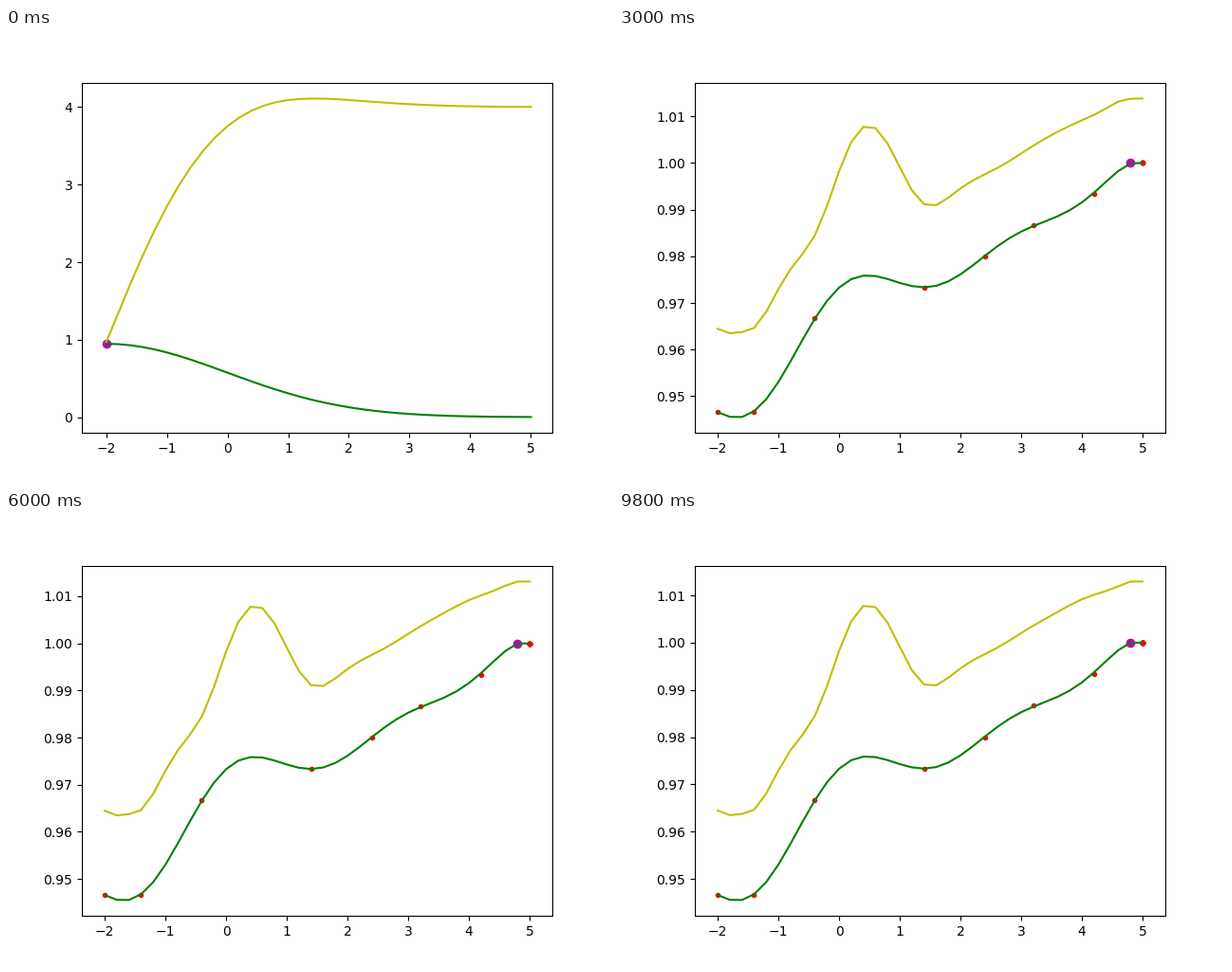
These frames come from a looping animation (640x480 px, 10000 ms). A matplotlib script:

```python
import numpy as np
import matplotlib.pyplot as plt
from matplotlib.animation import FuncAnimation

STEPS = 50
NOISE = 1e-5
KAPPA = 4
GRID = np.linspace(-2, 5, 36)

# Score of each setting the search visits: correct answers out of 150.
HITS = {-2.0: 142, -1.4: 142, -0.4: 145, 1.4: 146, 2.4: 147, 3.2: 148, 4.2: 149}


def score(x):
    return HITS.get(round(float(x), 1), 150) / 150


def kernel(a, b, length=2.0):
    return np.exp(-((a[:, None] - b[None, :]) ** 2) / (2 * length**2))


def posterior(xs, ys):
    k = kernel(xs, xs) + NOISE * np.eye(len(xs))
    cross = kernel(xs, GRID)
    weights = np.linalg.solve(k, cross)
    mean = weights.T @ ys
    var = 1 + NOISE - np.sum(cross * weights, axis=0)
    return mean, mean + KAPPA * np.sqrt(var)


def search():
    """Upper-confidence-bound search, one new sample per step."""
    xs, steps = [GRID[0]], []
    for _ in range(STEPS):
        x = np.array(xs)
        y = np.array([score(v) for v in xs])
        mean, upper = posterior(x, y)
        steps.append((x, y, mean, upper))
        xs.append(GRID[np.argmax(upper)])
    return steps


fig, ax = plt.subplots(figsize=(6.4, 4.8), dpi=100)
AXES_PX = np.array([496.0, 369.6])
steps = search()


def view(x, y, mean, upper):
    """Limits that leave room for the markers as well as the curves."""
    lo = np.array([GRID[0], min(mean.min(), upper.min())])
    hi = np.array([GRID[-1], max(mean.max(), upper.max())])
    points = np.column_stack([x, y])
    for radius, group in ((1.5, points), (3, points[-1:])):
        pad = radius * 1.1 * (hi - lo) / AXES_PX
        lo, hi = (np.minimum(lo, group.min(axis=0) - pad),
                  np.maximum(hi, group.max(axis=0) + pad))
    margin = 0.05 * (hi - lo)
    return lo - margin, hi + margin


def draw(i):
    x, y, mean, upper = steps[i]
    ax.clear()
    ax.plot(GRID, upper, "y")
    ax.plot(GRID, mean, "g")
    ax.scatter(x, y, c="r", marker=".")
    ax.scatter(x[-1:], y[-1:], c="m")
    lo, hi = view(x, y, mean, upper)
    ax.set_xlim(lo[0], hi[0])
    ax.set_ylim(lo[1], hi[1])


anim = FuncAnimation(fig, draw, frames=STEPS, interval=200,
                     init_func=lambda: None, repeat=True, repeat_delay=0)
plt.show()
```
